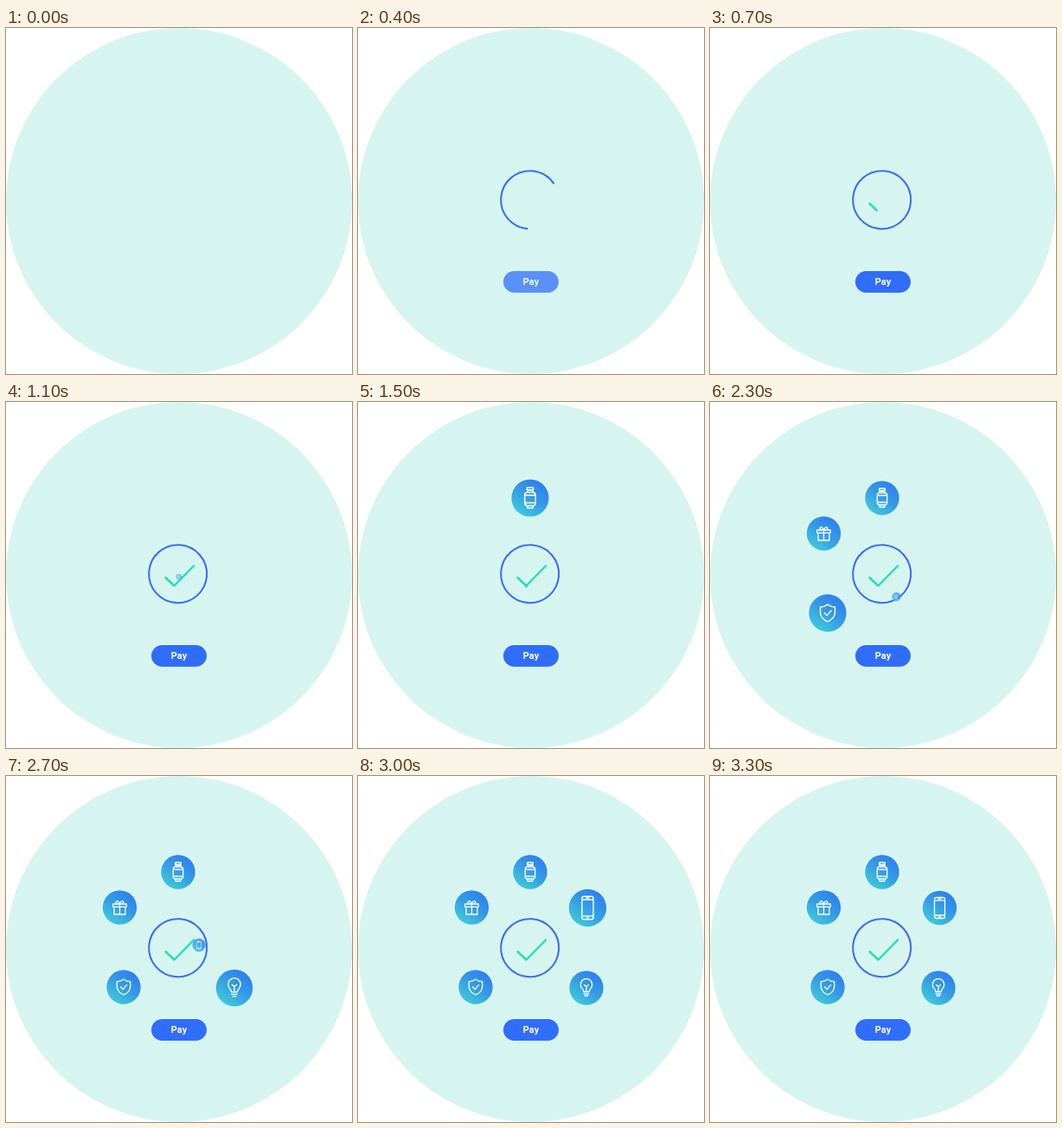
Write an HTML page that moves like this. It is 400 by 400 pixels and loops after 3400 ms.

```html
<!DOCTYPE html>
<html lang="en">
<head>
<meta charset="utf-8">
<title>Pay animation</title>
<style>
  html, body { margin: 0; width: 100%; height: 100%; overflow: hidden; background: #fff; }
  svg { display: block; width: 100vw; height: 100vh; }
  .line { fill: none; stroke-linecap: round; stroke-linejoin: round; }
  .icon path { fill: none; stroke: #fff; stroke-width: 1.3; stroke-linecap: round; stroke-linejoin: round; }
  text { font: 700 11px Roboto, Arial, sans-serif; fill: #fff; text-anchor: middle; }
</style>
</head>
<body>
<svg viewBox="0 0 400 400">
  <defs>
    <linearGradient id="disc" x1="0.8" y1="0.1" x2="0.2" y2="0.95">
      <stop offset="0" stop-color="#2f80ee"/>
      <stop offset="0.45" stop-color="#349be6"/>
      <stop offset="1" stop-color="#3fcadb"/>
    </linearGradient>
  </defs>
  <circle cx="200" cy="200" r="200" fill="#d7f5f0"/>
  <circle id="ring" class="line" cx="198.7" cy="198.7" r="33.5" pathLength="100"
    transform="rotate(94 198.7 198.7)" stroke="#3d70ee" stroke-width="2.1" style="stroke-linecap:butt"/>
  <path id="tick" class="line" d="M184.5 203L194.5 212.5L217 189.5" pathLength="100"
    stroke="#24dfbb" stroke-width="2.5"/>
  <g id="button">
    <rect x="168" y="281" width="64" height="25" rx="12.5" fill="#306dfd"/>
    <text x="200" y="297.3">Pay</text>
  </g>
  <g id="icons"></g>
</svg>
<script>
  const LOOP = 3400, STEP = 100;
  const RISE = 500, SETTLE = 200, PEAK = 1.1;
  const ORIGIN = [200, 219];

  // start time, resting centre, outline drawn around 0,0
  const items = [
    { start: 975, x: 199, y: 111, d:
      'M-3 -6V-8H3V-6M-3.3 -11H3.3V-8.5H-3.3ZM-3 -6H3Q5.7 -6 5.7 -3V5Q5.7 8 3 8H-3Q-5.7 8 -5.7 5V-3Q-5.7 -6 -3 -6M-5.7 -3H5.7M-5.7 5H5.7M-3 8V10.5H3V8' },
    { start: 1410, x: 131.5, y: 152, d:
      'M-7.7 -4H7.7V-0.7H-7.7ZM-6.5 -0.7V8H6.5V-0.7M0 -4V8M0 -4Q-5 -4 -4.3 -6.5Q-2.3 -9 0 -4Q2.3 -9 4.3 -6.5Q5 -4 0 -4' },
    { start: 1785, x: 136, y: 244, d:
      'M0 -9Q3.5 -6.4 7.7 -6.3V0Q7 6 0 9Q-7 6 -7.7 0V-6.3Q-3.5 -6.4 0 -9M-3.3 0L-0.8 2.6L3.7 -2.5' },
    { start: 2140, x: 264, y: 245, d:
      'M-3 4.5Q-3.2 2.5 -5 0.6A6.7 6.7 0 1 1 5 0.6Q3.2 2.5 3 4.5ZM-3 6.8H3M-1.8 9H1.8M-2.5 -3.5L0 -1.5L2.5 -3.5M0 -1.5V4.5' },
    { start: 2500, x: 265.5, y: 152.5, d:
      'M-4 -12H4Q6 -12 6 -10V10Q6 12 4 12H-4Q-6 12 -6 10V-10Q-6 -12 -4 -12M-6 -8.7H6M-6 8.5H6M-1 10.3H1M-1.5 -10.4H1.5' }
  ];

  const byId = id => document.getElementById(id);
  const clamp = v => Math.min(1, Math.max(0, v));
  const ease = v => { v = clamp(v); return v * v * (3 - 2 * v); };

  function make(tag, attrs, parent) {
    const el = document.createElementNS('http://www.w3.org/2000/svg', tag);
    for (const key in attrs) el.setAttribute(key, attrs[key]);
    return parent.appendChild(el);
  }

  for (const item of items) {
    item.el = make('g', { class: 'icon' }, byId('icons'));
    make('circle', { r: 19.7, fill: 'url(#disc)' }, item.el);
    make('path', { d: item.d }, item.el);
  }

  function trace(el, part) {
    el.style.visibility = part > 0 ? 'visible' : 'hidden';
    el.style.strokeDasharray = part < 1 ? `${part * 100} 200` : 'none';
  }

  function place(item, t) {
    const age = t - item.start;
    const move = ease(age / RISE);
    const scale = PEAK * move - (PEAK - 1) * ease((age - RISE) / SETTLE);
    const x = ORIGIN[0] + (item.x - ORIGIN[0]) * move;
    const y = ORIGIN[1] + (item.y - ORIGIN[1]) * move;
    item.el.style.display = age > 0 ? '' : 'none';
    item.el.setAttribute('transform', `translate(${x} ${y}) scale(${scale})`);
    item.el.setAttribute('opacity', clamp(0.4 + move * 1.3));
  }

  function draw(t) {
    trace(byId('ring'), clamp(t / 620));
    trace(byId('tick'), clamp((t - 600) / 400));
    byId('button').setAttribute('opacity', clamp(t / 540));
    items.forEach(item => place(item, t));
  }

  const began = performance.now();
  function tick() {
    const t = (performance.now() - began) % LOOP;
    draw(Math.floor(t / STEP) * STEP);
    requestAnimationFrame(tick);
  }
  tick();
</script>
</body>
</html>
```
